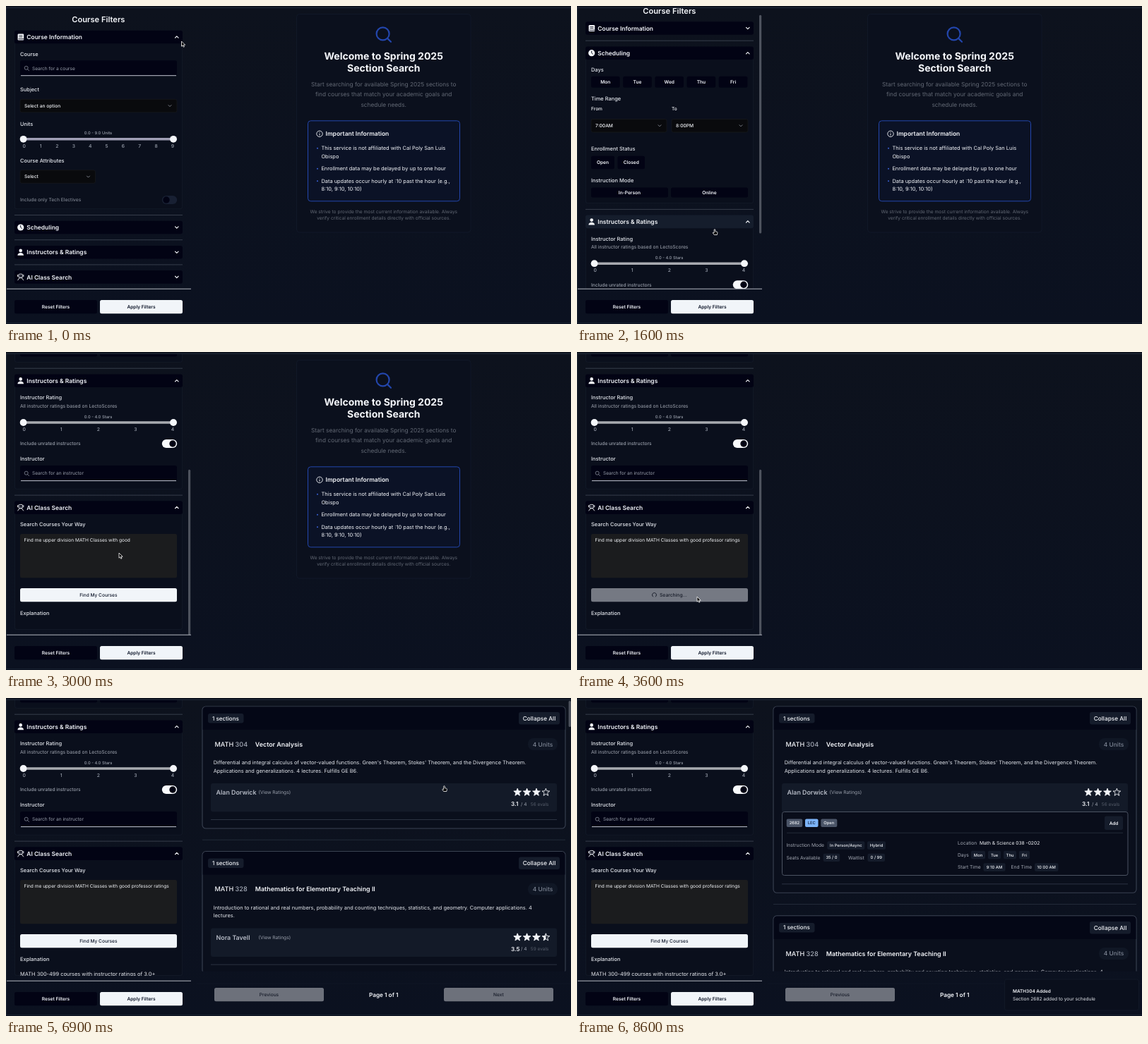
An HTML page that plays this animation: 800x451 px, repeating every 8.7 s.

```html
<!DOCTYPE html>
<html lang="en">
<head>
<meta charset="utf-8">
<title>Course search</title>
<style>
html, body { margin: 0; width: 100%; height: 100%; overflow: hidden; background: #0c111e; }
svg { display: block; width: 800px; height: 451px; font-family: Inter, sans-serif; }
text { white-space: pre; text-rendering: geometricPrecision; }
</style>
</head>
<body>
<svg id="stage" viewBox="0 0 800 451" xmlns="http://www.w3.org/2000/svg"></svg>
<script>
const LOOP = 8700, STEP = 100;
const INK = '#020314', WHITE = '#f4f6fa', GREY = '#9aa0ac', DIM = '#626874', CHIP = '#151c2b';
const stage = document.getElementById('stage');

// Markup helpers; text is placed by the middle of its line
const text = (x, y, s, size, fill = WHITE, weight = 400, anchor = 'start') =>
  `<text x="${x}" y="${y + size * 0.36}" font-size="${size}" fill="${fill}" font-weight="${weight}" text-anchor="${anchor}">${s}</text>`;
const mid = (x, y, s, size, fill, weight) => text(x, y, s, size, fill, weight, 'middle');
const rect = (x, y, w, h, fill, rx = 2.5, more = '') =>
  `<rect x="${x}" y="${y}" width="${w}" height="${h}" rx="${rx}" fill="${fill}" ${more}/>`;
const line = (x1, x2, y, color, w = 1) => `<path d="M${x1} ${y}H${x2}" stroke="${color}" stroke-width="${w}"/>`;
const path = (d, color, w = 1) =>
  `<path d="${d}" fill="none" stroke="${color}" stroke-width="${w}" stroke-linecap="round" stroke-linejoin="round"/>`;
const dot = (x, y, r, fill) => `<circle cx="${x}" cy="${y}" r="${r}" fill="${fill}"/>`;
const ring = (x, y, r, color, w) => `<circle cx="${x}" cy="${y}" r="${r}" fill="none" stroke="${color}" stroke-width="${w}"/>`;
const group = (id, s, more = '') => `<g id="${id}" ${more}>${s}</g>`;
const clip = (id, x, y, w, h) => `<clipPath id="${id}"><rect x="${x}" y="${y}" width="${w}" height="${h}"/></clipPath>`;
const chevron = (x, y, up, color, r = 2.3) => path(`M${x - r} ${y + (up ? r : -r) / 2}l${r} ${up ? -r : r}l${r} ${up ? r : -r}`, color, r / 2);

// Form parts
const label = (y, s) => text(20, y, s, 7.45, '#e6e9ef', 500);
const button = (x, y, w, h, s) => rect(x, y, w, h, INK) + mid(x + w / 2, y + h / 2, s, 6.6, WHITE, 600);
const select = (x, y, w, s) => rect(x, y, w, 18.5, '#090a0d', 2.5, 'stroke="#191a1d" stroke-width=".7"') +
  text(x + 6, y + 9.3, s, 6.65, WHITE, 500) + chevron(x + w - 10, y + 9.3, false, '#7c808a', 2);
const input = (y, s) => rect(20, y, 222, 22, INK) + line(21, 241, y + 21.5, '#c3c7d1') +
  ring(28.7, y + 10.6, 2.5, GREY, 0.7) + path(`M30.6 ${y + 12.5}l2 2`, GREY, 0.7) + text(37, y + 11, s, 6.55, GREY);
const toggle = (y, on) => rect(220.8, y - 6, 21.4, 12, on ? '#f8fafc' : '#182033', 6) + dot(on ? 236 : 227, y, 4.7, INK);
const slider = (y, max, unit, color) => {
  let s = mid(130.5, y - 8.5, `0.0 - ${max}.0 ${unit}`, 5.8, GREY, 500) + rect(20, y - 1.8, 222, 3.6, color, 1.8) +
    dot(24.6, y, 4.9, WHITE) + dot(237, y, 4.9, WHITE);
  for (let i = 0; i <= max; i++) s += mid(25.7 + i * 210.3 / max, y + 9.7, i, 6.8, GREY, 500);
  return s;
};

const icons = [
  rect(16.6, -4.5, 8.6, 9, WHITE, 1.2) + path('M18.8 -2H23M18.8 0H23', INK, 0.8) + path('M18 2.7H25', INK, 0.9),
  dot(20.7, 0, 4.6, WHITE) + path('M20.7 -2.6V0L22.4 1.4', INK, 0.9),
  dot(20.7, -2.3, 2.3, WHITE) + `<path d="M16.4 4.5C16.4 -.4 25 -.4 25 4.5Z" fill="${WHITE}"/>`,
  rect(17.8, -4.2, 5.8, 5, 'none', 1.6, `stroke="${WHITE}" stroke-width=".9"`) +
    path('M16.8 4.4L19 1.2H22.4L24.6 4.4M16.6 -3V-.8M24.8 -3V-.8M19.6 -1.6V-1.4M21.8 -1.6V-1.4', WHITE, 0.9)
];

const days = ['Mon', 'Tue', 'Wed', 'Thu', 'Fri'];
const examples = ['Examples:', '• "Find CSC 300-500 courses with good reviews, available Mon-', 'Thu"',
  '• "Show me morning USCP courses with open seats"', '• "I need MATH classes before 2pm with excellent professors"'];

const sections = [
  { name: 'Course Information', extra: 234.8, body:
    label(24, 'Course') + input(33.2, 'Search for a course') + label(74.5, 'Subject') + select(20, 88.3, 222, 'Select an option') +
    label(123, 'Units') + slider(144.8, 9, 'Units', '#a09fb5') + label(175, 'Course Attributes') + select(20, 188.8, 106.5, 'Select') +
    text(20, 231, 'Include only Tech Electives', 6.65, '#7d838f', 500) + toggle(231, false) },
  { name: 'Scheduling', extra: 204, body:
    label(24, 'Days') + days.map((d, i) => button(20 + i * 45.2, 33, 40.6, 16, d)).join('') + label(64.6, 'Time Range') +
    text(20, 79, 'From', 6.6, WHITE, 500) + text(134, 79, 'To', 6.6, WHITE, 500) +
    select(20, 93.8, 107, '7:00AM') + select(134, 93.8, 108, '8:00PM') + label(136, 'Enrollment Status') +
    button(20, 146, 33, 18.5, 'Open') + button(57.5, 146, 38.5, 18.5, 'Closed') + label(180.5, 'Instruction Mode') +
    button(20, 190.7, 109, 14.2, 'In-Person') + button(133, 190.7, 109, 14.2, 'Online') },
  { name: 'Instructors &amp; Ratings', extra: 144.7, body:
    label(24, 'Instructor Rating') + text(20, 36, 'All instructor ratings based on LectoScores', 6.75, '#a4a9b4') +
    slider(59.3, 4, 'Stars', '#a8aab0') + text(20, 89.3, 'Include unrated instructors', 6.65, GREY, 500) + toggle(89.3, true) +
    label(111, 'Instructor') + input(120.4, 'Search for an instructor') },
  { name: 'AI Class Search', extra: 164, body:
    label(24, 'Search Courses Your Way') + rect(20, 37.3, 222, 62.3, '#1b1c1e') +
    group('hint', examples.map((s, i) => text(25.5, 46 + i * 9.55, s, 6.58, GREY)).join('') +
      rect(234.8, 37.5, 7, 61.8, '#f1f1f1', 0) + rect(236, 39, 4.8, 48, '#a9a9a9', 2.4)) +
    '<text id="typed" x="25.5" y="48.4" font-size="6.58" fill="#f4f6fa"></text>' +
    rect(20, 114.3, 222, 19.4, '#757983', 2.5, 'id="find"') +
    group('findText', mid(130.8, 124, 'Find My Courses', 6.6, '#0f172a', 500)) +
    group('busy', path('M109.5 121A3 3 0 1 1 106.7 123', '#161b28', 0.9).replace('<path', '<path id="spin"') +
      text(117, 124, 'Searching...', 6.75, '#161b28', 500)) +
    label(149.6, 'Explanation') + group('why', text(20, 170.8, 'MATH 300-499 courses with instructor ratings of 3.0+', 7.45, '#e6e9ef')) }
];

const sectionMarkup = (s, i) => clip('clip' + i, 0, 9.3, 262, s.extra) + group('sec' + i,
  (i ? line(12, 250, -17.5, '#363d4a') : '') +
  `<g clip-path="url(#clip${i})">${rect(12.4, 5, 237.2, s.extra + 4, '#0a0f1c', 3, 'stroke="#161d2b" stroke-width=".8"')}${s.body}</g>` +
  rect(12, -9.3, 238, 18.6, INK, 3, `id="head${i}"`) + icons[i] + text(29.3, 0.2, s.name, 8.45, WHITE, 600) +
  group('up' + i, chevron(241.8, 0, true, WHITE)) + group('down' + i, chevron(241.8, 0, false, WHITE)));

const sidebar = clip('side', 0, 3, 262, 398) + `<g clip-path="url(#side)">` +
  group('scroll', mid(130.8, 19, 'Course Filters', 11.15, WHITE, 600) + sections.map(sectionMarkup).join('')) + '</g>' +
  rect(258, 0, 3.2, 10, '#4d525d', 1.6, 'id="thumb"') + line(1, 262, 401.2, '#b4b8c1') +
  button(12, 417, 117, 19.3, 'Reset Filters') + rect(133, 417, 117, 19.3, '#f1f5f9') + mid(191.5, 426.7, 'Apply Filters', 6.6, '#0f172a', 600);

const BLUE = '#2346ac';
const notes = [[201.5, 'This service is not affiliated with Cal Poly San Luis', 1], [213.3, 'Obispo'],
  [230.5, 'Enrollment data may be delayed by up to one hour', 1],
  [248, 'Data updates occur hourly at :10 past the hour (e.g.,', 1], [259.6, '8:10, 9:10, 10:10)']];
const welcome = rect(411.5, 11.5, 246.5, 309.5, '#0b101d', 4, 'stroke="#131b2b" stroke-width=".8"') +
  ring(533.6, 39.4, 9, BLUE, 2.2) + path('M540.1 45.9L545 50.8', BLUE, 2.2) +
  mid(534.7, 71, 'Welcome to Spring 2025', 14, WHITE, 700) + mid(534.7, 88.4, 'Section Search', 14, WHITE, 700) +
  ['Start searching for available Spring 2025 sections to', 'find courses that match your academic goals and', 'schedule needs.']
    .map((s, i) => mid(534.7, 111.3 + i * 14.2, s, 8.3, DIM)).join('') +
  rect(427.5, 162.8, 215, 114, '#0b1226', 4, `stroke="${BLUE}"`) +
  ring(444, 181.3, 4.2, WHITE, 0.9) + path('M444 181.2V183.3M444 179.3V179.4', WHITE, 0.9) +
  text(452.6, 181.3, 'Important Information', 8.5, WHITE, 600) +
  notes.map(([y, s, first]) => (first ? dot(441, y + 0.3, 1, '#3b63d8') : '') + text(446.4, y, s, 7.45)).join('') +
  mid(534.8, 291.6, 'We strive to provide the most current information available. Always', 6.62, DIM) +
  mid(534.8, 300.4, 'verify critical enrollment details directly with official sources.', 6.62, DIM);

// Result cards
const starPoints = (x, y, from, to) => {
  const p = [];
  for (let k = from; k <= to; k++) {
    const a = (k * 36 - 90) * Math.PI / 180, r = k % 2 ? 2.4 : 5.6;
    p.push((x + r * Math.cos(a)).toFixed(2) + ',' + (y + r * Math.sin(a)).toFixed(2));
  }
  return p.join(' ');
};
const star = (x, y, fill) =>
  `<polygon points="${starPoints(x, y, 0, 9)}" fill="none" stroke="${WHITE}" stroke-width=".9" stroke-linejoin="round"/>` +
  (fill ? `<polygon points="${starPoints(x, y, fill < 1 ? 5 : 0, 10)}" fill="${WHITE}"/>` : '');
const chip = (x, y, w, s, fill = CHIP, ink = WHITE) => rect(x, y - 5.7, w, 11.4, fill, 2) + mid(x + w / 2, y, s, 5.8, ink, 500);
const card = (id, c) =>
  rect(278, 12, 514, 173, '#0a0f1c', 5, `id="${id}" stroke="#3a4252" stroke-width="1.1"`) +
  '<path d="M278.6 45V17a4.5 4.5 0 0 1 4.5-4.5H787a4.5 4.5 0 0 1 4.5 4.5V45Z" fill="#040716"/>' +
  rect(286, 22, 50.5, 13.5, CHIP, 3) + text(292, 28.7, '1 sections', 8, WHITE, 500) +
  rect(726, 20, 58, 17.5, CHIP, 3) + mid(755, 28.7, 'Collapse All', 8.25, WHITE, 500) +
  text(295.5, 65.5, `MATH <tspan fill="#a7adb9">${c.no}</tspan>`, 9.1, WHITE, 500) + text(352.8, 65.5, c.title, 8.88, WHITE, 600) +
  rect(739, 57, 42, 17, '#101725', 8) + mid(760, 65.5, '4 Units', 8.4, '#7d8594', 500) +
  text(293.7, 91.7, c.about[0], 7.4, '#e2e5eb') + text(293.7, 103.2, c.about[1], 7.4, '#e2e5eb') +
  rect(290, 121, 490, 40.3, '#131a28', 3) + text(297.5, 134, c.who, 8.9, '#b6bbc6', 600) + text(357.5, 134, '(View Ratings)', 6.7, GREY) +
  [1, 1, 1, c.last].map((f, i) => star(724.2 + i * 13.4, 133.8, f)).join('') +
  text(715, 150.5, c.score, 8.2, WHITE, 600) + text(729, 150.5, '/ 4', 6.6, GREY) + text(742.8, 150.5, c.evals + ' evals', 6.5, '#555c69');

const label2 = (x, y, s) => text(x, y, s, 6.7, '#a4a9b4');
const detail = clip('open', 280, 161, 510, 91.5) + '<g clip-path="url(#open)">' +
  rect(290.5, 161.5, 489.5, 90, '#090d1a', 3, 'stroke="#4b5362"') +
  chip(296.7, 177.3, 22.5, '2682', '#4b5568') + chip(323, 177.3, 18.5, 'LEC', '#7db4f8', '#12203c') + chip(345.3, 177.3, 23, 'Open', '#4b5568') +
  rect(747, 167.5, 26, 19.5, CHIP) + mid(760, 177.3, 'Add', 6.4, WHITE, 600) + line(297, 773, 191.3, '#2a3241', 0.8) +
  label2(296.5, 209, 'Instruction Mode') + chip(354.3, 209, 53, 'In Person/Async') + chip(411, 209, 26, 'Hybrid') +
  label2(296.5, 226.4, 'Seats Available') + chip(348.7, 226.4, 23.5, '35 / 0') + label2(384, 226.4, 'Waitlist') + chip(411.5, 226.4, 24.5, '0 / 99') +
  label2(539, 206, 'Location') + text(570, 206, 'Math &amp; Science 038 -0202', 6.7) + label2(539, 222.5, 'Days') +
  chip(558, 222.5, 20, 'Mon') + chip(582, 222.5, 18, 'Tue') + chip(604, 222.5, 18, 'Thu') + chip(626, 222.5, 15, 'Fri') +
  label2(539, 240, 'Start Time') + chip(575.5, 240, 31, '9:10 AM') + label2(614.5, 240, 'End Time') + chip(648, 240, 33.5, '10:00 AM') + '</g>';

const rule = line(290, 780, 172.5, '#2b3342');
const results = clip('list', 270, 3, 530, 384.5) + '<g clip-path="url(#list)">' +
  card('card', { no: 304, title: 'Vector Analysis', who: 'Alan Dorwick', last: 0, score: '3.1', evals: 56, about: [
    'Differential and integral calculus of vector-valued functions. Green\'s Theorem, Stokes\' Theorem, and the Divergence Theorem.',
    'Applications and generalizations. 4 lectures. Fulfills GE B6.'] }) + detail +
  group('below', rule + line(278, 792, 201.2, '#222a38') + '<g transform="translate(0 205.6)">' +
    card('next', { no: 328, title: 'Mathematics for Elementary Teaching II', who: 'Nora Tavell', last: 0.5, score: '3.5', evals: 59, about: [
      'Introduction to rational and real numbers, probability and counting techniques, statistics, and geometry. Computer applications. 4',
      'lectures.'] }) + rule + '</g>') + '</g>' +
  rect(796.6, 4, 3.4, 37, '#4d525d', 1.6, 'id="bar"') + line(270, 800, 405, '#111827', 0.6) +
  rect(295, 411, 155, 19.3, '#6d717b') + mid(372.5, 420.7, 'Previous', 6.6, '#161b28', 500) +
  mid(534.7, 420.7, 'Page 1 of 1', 8.25, WHITE, 600) + rect(620, 411, 155, 19.3, '#6d717b') + mid(697.5, 420.7, 'Next', 6.6, '#161b28', 500);

const toast = rect(605.5, 399, 190, 44, '#0a0f1c', 3, 'stroke="#141b29" stroke-width=".8"') +
  text(617, 415.2, 'MATH304 Added', 6.45, WHITE, 600) + text(617, 427, 'Section 2682 added to your schedule', 6.6, '#e2e5eb');

const pointer = 'stroke="#fff" stroke-width=".8" fill="#000" stroke-linejoin="round"';
stage.innerHTML = '<linearGradient id="bg" x2="0" y2="1"><stop stop-color="#0d121d"/><stop offset="1" stop-color="#0b1120"/></linearGradient>' +
  rect(0, 0, 800, 451, 'url(#bg)', 0) + line(0, 800, 2.5, '#212a39') + path('M.7 3V449', '#1c2533') + line(0, 800, 449.5, '#182130') +
  sidebar + group('welcome', welcome) + group('loading', mid(534.6, 35.5, 'Loading Sections...', 6.85, '#d4d8e0', 500)) +
  group('results', results) + group('toast', toast) +
  group('arrow', `<path d="M0 0V7.2L1.7 5.7 2.8 8.2 4 7.7 2.9 5.2H5.2Z" ${pointer}/>`) +
  group('hand', `<path d="M-.8 .6Q0-.5 .8 .6V3.2L3.2 3.8Q4 4 3.9 5L3.3 8H-.8L-2.8 5.2Q-2.4 4-.8 5.2Z" ${pointer}/>`);

const el = {};
stage.querySelectorAll('[id]').forEach(n => el[n.id] = n);
const set = (id, k, v) => el[id].setAttribute(k, v);
const show = (id, on) => set(id, 'visibility', on ? 'inherit' : 'hidden');
const move = (id, x, y) => set(id, 'transform', `translate(${x} ${y})`);

const ramp = (t, a, b) => Math.min(1, Math.max(0, (t - a) / (b - a)));
const ease = p => p * p * (3 - 2 * p);
// Keys are [time, ...values]
const track = (keys, t) => {
  let i = 0;
  while (i < keys.length - 2 && t >= keys[i + 1][0]) i++;
  const a = keys[i], b = keys[i + 1], p = ease(ramp(t, a[0], b[0]));
  return a.slice(1).map((v, j) => v + (b[j + 1] - v) * p);
};

const cursorKeys = [[0, 248.5, 50], [200, 243, 46], [300, 243, 46], [500, 236, 79], [700, 234, 80], [1100, 195, 316.5], [1600, 195, 316.5],
  [1800, 196, 382], [2000, 196, 382], [2300, 197, 261], [2500, 160, 285], [3000, 160, 285], [3300, 170, 347], [4000, 170, 347],
  [4700, 586, 51.5], [6300, 586, 51.5], [6800, 620.5, 124.5], [7300, 620.5, 124.5], [7800, 760, 177], [8100, 760, 177],
  [8400, 768, 16], [8500, 788, 6], [8600, 806, -12]];
const scrollKeys = [[0, 0], [1400, 0], [1600, 12.5], [1800, 116], [2000, 116], [2300, 259], [2400, 277.7]];
const QUERY = 'Find me upper division MATH Classes with good professor ratings';

function draw(t) {
  const [cx, cy] = track(cursorKeys, t), [scroll] = track(scrollKeys, t);
  const busy = t >= 3500 && t < 6200, done = t >= 6200;
  const open = [1 - ramp(t, 0, 200), ramp(t, 500, 700), ramp(t, 1200, 1400), ramp(t, 1900, 2100)];

  let y = 44, pointing = false;
  sections.forEach((s, i) => {
    const h = s.extra * open[i], top = y - scroll;
    const hover = cx > 12 && cx < 247 && Math.abs(cy - top) < 11;
    pointing = pointing || hover;
    move('sec' + i, 0, y);
    el['clip' + i].firstChild.setAttribute('height', h);
    set('head' + i, 'fill', hover ? '#151d2c' : INK);
    show('up' + i, open[i] > 0.5);
    show('down' + i, open[i] <= 0.5);
    y += 35.2 + h;
  });
  move('scroll', 0, -scroll);

  const view = 398, total = y - 22.2;
  show('thumb', total > view + 2 && t >= 1400 && t < 4100);
  set('thumb', 'y', 3 + scroll * view / total);
  set('thumb', 'height', view * view / total);

  const typed = QUERY.slice(0, Math.round(QUERY.length * ramp(t, 2500, 3200)));
  el.typed.textContent = typed;
  show('hint', !typed);
  set('find', 'fill', typed && !busy ? '#f1f5f9' : '#757983');
  show('findText', !busy);
  show('busy', busy);
  set('spin', 'transform', `rotate(${t * 0.36} 109.5 124)`);
  show('why', done);

  show('welcome', t < 3500);
  show('loading', t >= 3700 && !done);
  show('results', done);
  const grow = 91.3 * ease(ramp(t, 7000, 7300));
  set('card', 'height', 173 + grow);
  el.open.firstChild.setAttribute('height', grow);
  move('below', 0, grow);
  show('bar', done && t < 7300);

  const pop = ramp(t, 7900, 8200);
  show('toast', pop > 0);
  set('toast', 'opacity', pop);
  move('toast', 0, 30 * (1 - ease(pop)));

  pointing = pointing || (t >= 6700 && t < 8300);
  show('hand', pointing);
  show('arrow', !pointing);
  move(pointing ? 'hand' : 'arrow', cx, cy);
}

function tick() {
  draw(Math.floor(performance.now() % LOOP / STEP) * STEP);
  requestAnimationFrame(tick);
}
tick();
</script>
</body>
</html>
```
